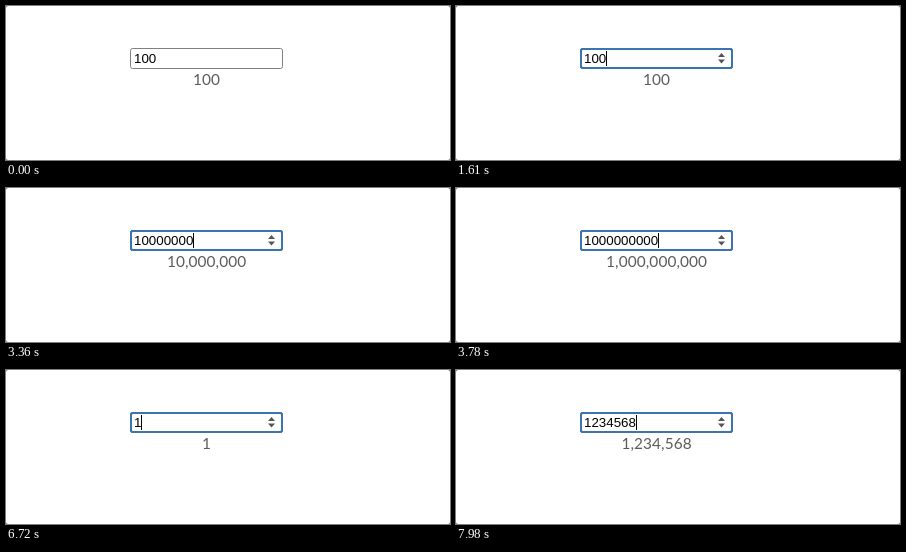
Recreate the animation shown at these times as an HTML page. Size 444 px wide and 154 px high, loop 8 s.

```html
<!DOCTYPE html>
<html lang="en">
<head>
<meta charset="utf-8">
<title>Number formatting</title>
<style>
  html, body { margin: 0; width: 100%; height: 100%; overflow: hidden; background: #777; }
  svg { display: block; width: 444px; height: 154px; }
  #value { font: 13.333px "Liberation Sans", Arial, sans-serif; fill: #000; }
  #label { font: 15.4px Lato, "Open Sans", sans-serif; letter-spacing: .1px; fill: #5c5c5c; text-anchor: middle; }
  #field { fill: #fff; stroke: #808080; stroke-width: 1; }
  #field.hover { stroke: #555; }
  #ring { fill: none; stroke: #3b74ae; stroke-width: 2; }
</style>
</head>
<body>
<svg viewBox="0 0 444 154">
  <rect width="444" height="154" rx="2.5" fill="#fff"/>
  <rect id="field" x="124.5" y="42.5" width="152" height="20" rx="2"/>
  <rect id="ring" x="125" y="43" width="151" height="19" rx="2"/>
  <rect id="selection" x="128" y="45" width="74" height="15" fill="#b9d9fb"/>
  <text id="value" x="128" y="57"></text>
  <rect id="caret" y="45" width="1" height="15"/>
  <path id="spinner" d="M262 51l3.5-4 3.5 4zM262 53.5h7l-3.5 4z" fill="#555"/>
  <text id="label" x="200.6" y="79"></text>
  <path id="pointer" d="M0 0V14.5L3.4 11.4 5.7 16.6 8.2 15.5 5.9 10.4H10.4Z"
        fill="#000" stroke="#fff" stroke-width="1" stroke-linejoin="round"/>
</svg>
<script>
const LOOP = 8000;
const FOCUS = 1610, SELECT = 5810, CLEAR = 6160;

// [time, input text]
const edits = [
  [0, "100"], [2380, "1000"], [2730, "10000"], [2940, "100000"], [3080, "1000000"],
  [3360, "10000000"], [3500, "100000000"], [3780, "1000000000"], [CLEAR, ""],
  [6720, "1"], [6930, "12"], [7140, "123"], [7350, "1234"], [7490, "12345"],
  [7700, "123456"], [7980, "1234568"]
];

// [time, caret visible]
const blinks = [
  [0, false], [FOCUS, true], [2100, false], [2380, true], [4270, false],
  [4830, true], [5320, false], [CLEAR, true]
];

// [time, pointer tip x, y]
const moves = [
  [70, 126, 110], [210, 130, 107], [350, 143, 95], [420, 158, 79], [490, 175, 60],
  [630, 191, 42], [700, 200, 31], [840, 205, 26], [980, 203, 26],
  [1120, 174, 47], [1190, 174, 51], [1260, 174, 53]
];

const el = Object.fromEntries([...document.querySelectorAll("[id]")].map(n => [n.id, n]));
const latest = (list, t) => list.findLast(step => step[0] <= t);
const show = (node, on) => node.setAttribute("visibility", on ? "visible" : "hidden");
const setText = (node, text) => { if (node.textContent !== text) node.textContent = text; };

function draw(t) {
  const text = latest(edits, t)[1];
  const move = latest(moves, t);
  const focused = t >= 1540;

  setText(el.value, text);
  setText(el.label, Number(text).toLocaleString("en-US"));
  el.caret.setAttribute("x", Math.round(128 + text.length * 7.415));
  el.field.classList.toggle("hover", t >= 1190);

  show(el.caret, latest(blinks, t)[1]);
  show(el.ring, focused);
  show(el.spinner, t >= 1190);
  show(el.selection, t >= SELECT && t < CLEAR);
  show(el.pointer, move && t < FOCUS);
  if (move) el.pointer.setAttribute("transform", `translate(${move[1]} ${move[2]})`);
}

const start = performance.now();
function tick() {
  draw((performance.now() - start) % LOOP);
  requestAnimationFrame(tick);
}
draw(0);
requestAnimationFrame(tick);
</script>
</body>
</html>
```
